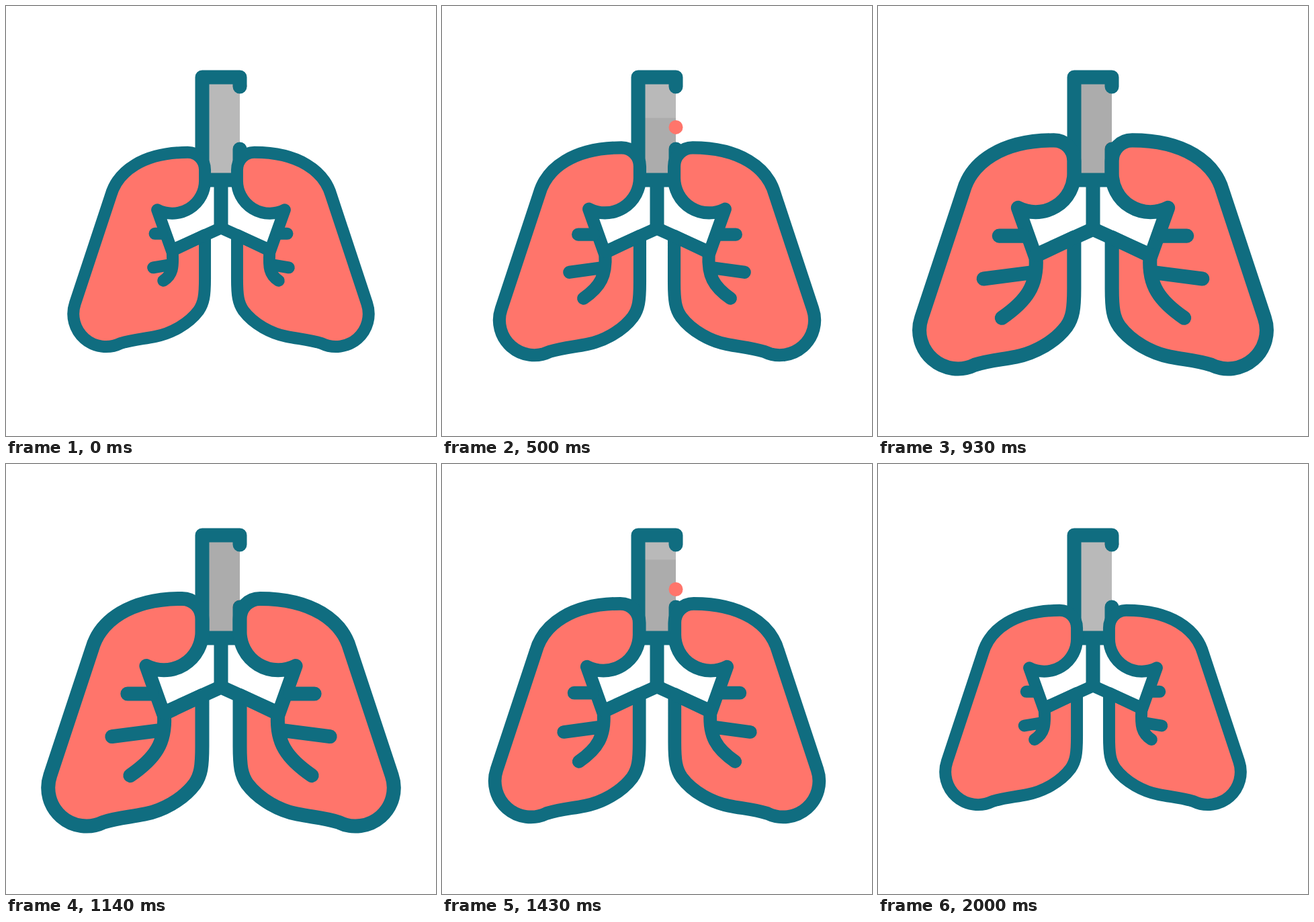
These frames come from a looping animation (640 px wide and 640 px high, 2.07 s). An HTML page:

```html
<!DOCTYPE html>
<html lang="en">
<head>
<meta charset="utf-8">
<title>Breathing lungs</title>
<style>
  html, body { margin: 0; width: 100%; height: 100%; overflow: hidden; background: #fff; }
  svg { display: block; width: 100vw; height: 100vh; }
  .line { fill: none; stroke: #106d80; stroke-width: 21; stroke-linejoin: round; stroke-linecap: round; }
  .lung { fill: #ff756b; }
</style>
</head>
<body>
<svg viewBox="0 0 640 640">
  <path fill="#b9b9b9" d="M292 106H348V259H292Z"/>
  <rect id="air" x="292" width="56" fill="#acacac"/>
  <circle id="dot" cx="348" r="10.5" fill="#ff756b"/>
  <path class="line" d="M348 120V106H292V259H348V213"/>
  <g id="lungs">
    <g id="half">
      <path class="line lung" d="M262 200.5C279 200.5 292 214 292 231V250A57 57 0 0 1 209 300.5
        L234.5 372 292 344.5V420C292 450 290 463 281 476C263 500 232 516 206 521
        C184 525.5 168 526 145 533A57 57 0 0 1 66 463.5L128 276C140 233 185 200.5 262 200.5Z"/>
      <path id="twigs" class="line"/>
    </g>
    <use href="#half" transform="matrix(-1 0 0 1 640 0)"/>
    <path class="line" style="stroke-linejoin:miter" d="M236 370L320 332 404 370"/>
  </g>
  <path class="line" style="stroke-linecap:butt" d="M320 259V331"/>
</svg>
<script>
const LOOP = 2070, FPS = 14, HALF = 14.5;
const $ = id => document.getElementById(id);
const mix = (a, b, k) => a + (b - a) * k;

function smooth(from, to, x) {
  const u = Math.min(1, Math.max(0, (x - from) / (to - from)));
  return u * u * (3 - 2 * u);
}

// Three airways whose tips slide outwards as k goes from 0 to 1
function twigs(k) {
  const m = (a, b) => mix(a, b, k).toFixed(2);
  return `M217 342H${m(205.3, 181)}M232 396L${m(203, 158)} ${m(401, 405.5)}`
    + `M235.5 374C${m(237, 238)} ${m(400, 415)} ${m(236, 222)} ${m(413, 438)} ${m(220.5, 185)} ${m(423, 463.5)}`;
}

function draw(now) {
  // The motion advances in 14 steps per second
  const step = Math.floor((now % LOOP + 5) * FPS / 1000);

  // Breath rises from 0 to 1 and falls again over the loop
  const breath = Math.max(0, 1 - Math.abs(step + .27 - HALF) / HALF);
  const swell = (1 - Math.cos(Math.PI * breath ** 1.26)) / 2;
  const size = mix(.855, 1.0095, swell);
  const fall = smooth(0, 11.6, step) - smooth(16.5, 26.5, step);
  const fill = smooth(1.1, 11.3, step) - smooth(17.3, 26.7, step);
  const top = mix(248, 116, fill);

  $('lungs').setAttribute('transform', `translate(320 320) scale(${size}) translate(-320 -320)`);
  $('twigs').setAttribute('d', twigs(Math.min(1, 1.14 * breath)));
  $('dot').setAttribute('cy', mix(119, 213, fall));
  $('air').setAttribute('y', top);
  $('air').setAttribute('height', 259 - top);
}

const start = performance.now();
function tick() {
  draw(performance.now() - start);
  requestAnimationFrame(tick);
}
tick();
</script>
</body>
</html>
```
